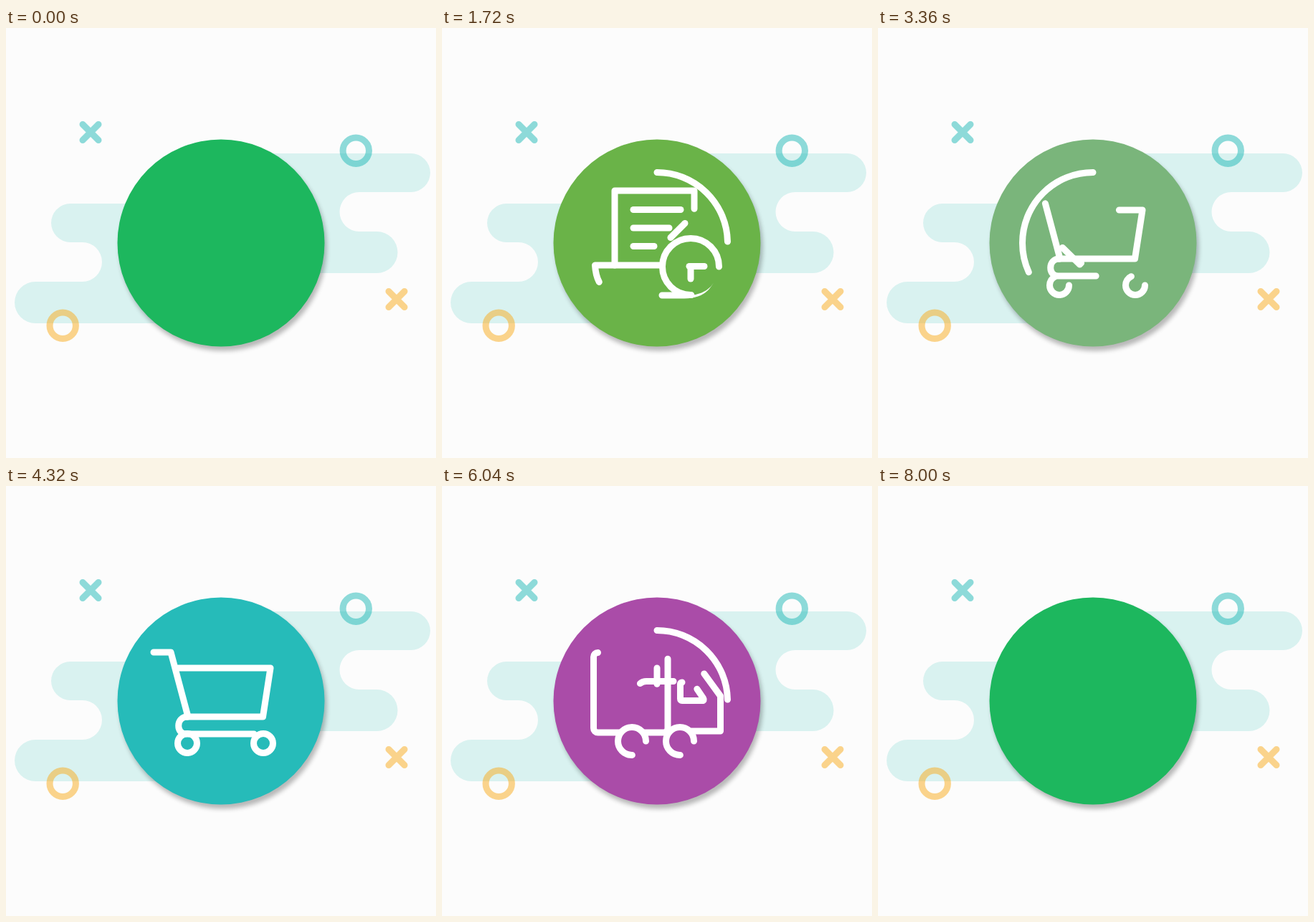
Recreate the animation shown at these times as an HTML page. Size 600 px wide and 600 px high, loop 8480 ms.

```html
<!DOCTYPE html>
<html lang="en">
<head>
<meta charset="utf-8">
<title>Order steps</title>
<style>
  html, body { margin: 0; width: 100%; height: 100%; overflow: hidden; background: #fcfcfc; }
  svg { display: block; width: 100%; height: 100%; }
  .line { fill: none; stroke-width: 9; stroke-linecap: round; stroke-linejoin: round; }
</style>
</head>
<body>
<svg viewBox="0 0 600 600">
  <defs>
    <filter id="soft" x="-10%" y="-10%" width="120%" height="120%">
      <feGaussianBlur stdDeviation="3"/>
    </filter>
    <mask id="clockGap" maskUnits="userSpaceOnUse" x="0" y="0" width="600" height="600">
      <rect width="600" height="600" fill="#fff"/>
      <circle cx="347" cy="333" r="39.5"/>
    </mask>
    <mask id="wheelGap" maskUnits="userSpaceOnUse" x="0" y="0" width="600" height="600">
      <rect width="600" height="600" fill="#fff"/>
      <circle cx="265" cy="356" r="19.5"/>
      <circle cx="332" cy="356" r="19.5"/>
    </mask>
  </defs>

  <rect width="600" height="600" fill="#fcfcfc"/>
  <g fill="#d9f2f0">
    <path d="M300 175H565a27 27 0 0 1 0 54H493a27.5 27.5 0 0 0 0 55H517.500a29 29 0 0 1 0 58H300z"/>
    <path d="M300 245H90a27 27 0 0 0 0 54H106.500a27.500 27.500 0 0 1 0 55H41a29 29 0 0 0 0 58H300z"/>
  </g>
  <g class="line" stroke="#20bab8" stroke-opacity=".5">
    <path d="M107 134.500l22 22m0-22l-22 22"/>
    <circle cx="488.300" cy="171.200" r="18.200"/>
  </g>
  <g class="line" stroke="#f9ac1d" stroke-opacity=".5">
    <path d="M534 367.500l22 22m0-22l-22 22"/>
    <circle cx="79.200" cy="415.200" r="18.200"/>
  </g>

  <circle cx="303" cy="306" r="144.500" fill="#000" opacity=".27" filter="url(#soft)"/>
  <circle id="disc" cx="300" cy="300" r="144.500"/>
  <g id="icons" class="line" stroke="#fff"></g>
</svg>

<script>
const LOOP = 8480, STEP = 1440, MOVE = 800;
const colors = [
  [29, 183, 94], [249, 171, 30], [38, 187, 185],
  [138, 68, 226], [230, 92, 60], [29, 183, 94]
];

const round = (x, y, r) => `M${x + r} ${y}a${r} ${r} 0 1 1 ${-2 * r} 0a${r} ${r} 0 1 1 ${2 * r} 0z`;
const ring = 'M300 201.500a98.500 98.500 0 1 1 0 197a98.500 98.500 0 1 1 0 -197z';

// Each stroke: d, optional mask, optional late flag for a delayed erase.
const icons = [
  [ // laptop and clock
    { d: 'M352 331V227H241V331', mask: 'clockGap' },
    { d: 'M307 373H255Q216 373 213.500 331H380Q377 373 338 373z', mask: 'clockGap' },
    { d: 'M267 253.500H333', late: true },
    { d: 'M267 279H317', late: true },
    { d: 'M267 304.500H296', late: true },
    { d: round(347, 333, 39.5) },
    { d: 'M345 332.500H366', late: true },
    { d: 'M347 332.500V350', late: true }
  ],
  [ // check
    { d: ring },
    { d: 'M339 272.500L281.500 330L257.500 306.500' }
  ],
  [ // cart
    { d: 'M254 322L230 232H206' },
    { d: 'M253 322H358.500L369 254H240' },
    { d: 'M253 322C237 322 237 346 251 346H346' },
    { d: round(253, 359, 13.5) },
    { d: round(359, 359, 13.5) }
  ],
  [ // truck
    { d: 'M217.500 232.500H309a6 6 0 0 1 6 6V338a6 6 0 0 1 -6 6H217.500a6 6 0 0 1 -6 -6V238.500a6 6 0 0 1 6 -6z', mask: 'wheelGap' },
    { d: 'M318 254H360L388.500 293V342H318', mask: 'wheelGap' },
    { d: 'M335 274H347.500Q349.500 274 351 276L364.500 296Q366.500 299.500 363 299.500H335Q332.500 299.500 332.500 297V276.500Q332.500 274 335 274z' },
    { d: round(265, 356, 19.5) },
    { d: round(332, 356, 19.5) }
  ],
  [ // coin
    { d: ring },
    { d: 'M300 254V344.500' },
    { d: 'M323 272.500H285a13.300 13.300 0 0 0 0 26.800H314.500a13.500 13.500 0 0 1 0 27H274.500' }
  ]
];

const root = document.getElementById('icons');
const disc = document.getElementById('disc');

for (const icon of icons) {
  for (const s of icon) {
    s.el = document.createElementNS('http://www.w3.org/2000/svg', 'path');
    s.el.setAttribute('d', s.d);
    s.el.setAttribute('pathLength', 100);
    if (s.mask) s.el.setAttribute('mask', `url(#${s.mask})`);
    root.append(s.el);
  }
}

const clamp = v => Math.min(1, Math.max(0, v));
const ease = u => u < .5 ? 2 * u * u : 1 - 2 * (1 - u) ** 2;

// Show the part of a stroke between two fractions of its length.
function span(el, from, to, shown) {
  el.style.display = shown ? '' : 'none';
  if (!shown) return;
  const full = from <= 0 && to >= 1;
  el.style.strokeDasharray = full ? 'none' : `${Math.max(.01, (to - from) * 100)} 250`;
  el.style.strokeDashoffset = full ? 0 : -from * 100;
}

function draw(t) {
  const n = Math.min(5, Math.floor(t / STEP));
  const u = clamp((t - n * STEP) / MOVE);
  const p = ease(u);
  const a = colors[Math.max(0, n - 1)], b = colors[n];
  disc.setAttribute('fill', `rgb(${a.map((v, i) => Math.round(v + (b[i] - v) * u))})`);

  icons.forEach((icon, i) => {
    for (const s of icon) {
      if (i === n) span(s.el, 0, p, i === 2 || u > .03);
      else if (i === n - 1) span(s.el, s.late ? clamp((p - .25) / .75) : p, 1, u < 1);
      else span(s.el, 0, 0, false);
    }
  });
}

function tick() {
  draw(performance.now() % LOOP);
  requestAnimationFrame(tick);
}
tick();
</script>
</body>
</html>
```
